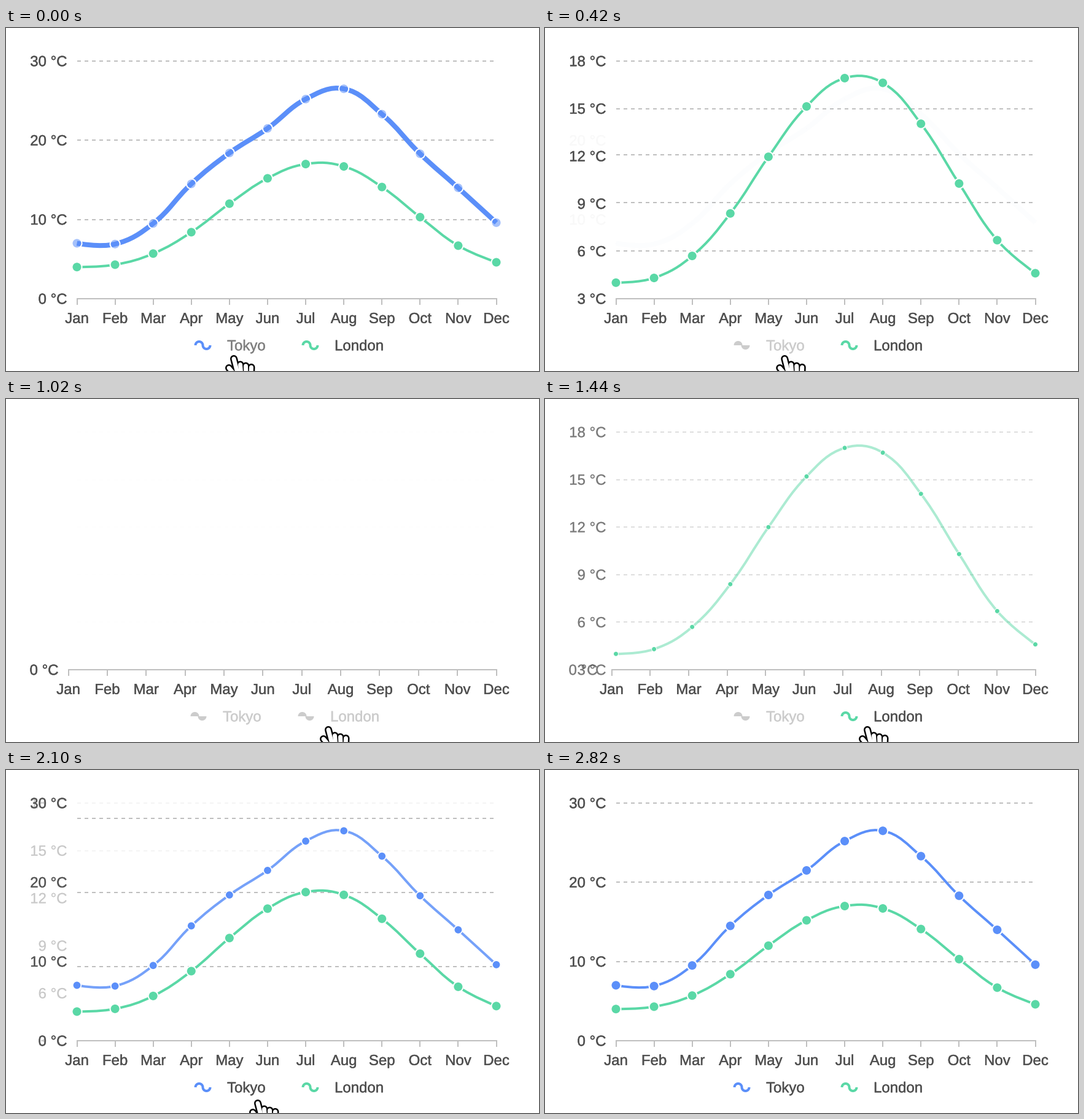
A matplotlib script for the animation above (2.88 s loop, 868 px wide and 560 px high).

```python
import math
from itertools import zip_longest

import matplotlib.pyplot as plt
import numpy as np
from matplotlib.animation import FuncAnimation
from matplotlib.patches import Circle, PathPatch
from matplotlib.path import Path
from matplotlib.patheffects import withStroke

W, H, DPI = 868, 560, 100
STEP_MS, FRAMES = 60, 48
PT = 72 / DPI  # points per pixel

LEFT, RIGHT, TOP, BASE = 115.5, 798.5, 54, 442
TEXT, AXIS, OFF, DIM = "#505050", "#BFBFBF", "#CCCCCC", "#808080"
MONTHS = "Jan Feb Mar Apr May Jun Jul Aug Sep Oct Nov Dec".split()
COUNT = len(MONTHS)


def yearly(mean, cos, sin):
    """Monthly temperatures as a short sum of yearly harmonics."""
    angle = np.arange(COUNT) * math.tau / COUNT
    temps = np.full(COUNT, mean)
    for k, a in enumerate(cos, 1):
        temps += a * np.cos(k * angle)
    for k, b in enumerate(sin, 1):
        temps += b * np.sin(k * angle)
    return np.round(temps, 1)


SERIES = {
    "Tokyo": ("#5B8FF9", yearly(16.22, [-9.1, -0.15],
                                [-2.62, 0.4, -0.65, 0.26, 0.07])),
    "London": ("#5AD8A6", yearly(9.91, [-6.62, 0.55, 0.12], [-0.93, 0.32])),
}


class Scene:
    """One settled state of the chart: its ticks, left edge and visible series."""

    def __init__(self, ticks, left, *shown):
        self.ticks, self.left, self.shown = ticks, left, shown

    def y(self, value):
        lo, hi = self.ticks[0], self.ticks[-1]
        return BASE - (BASE - TOP) * (value - lo) / max(hi - lo, 1)


BOTH = Scene(range(0, 31, 10), LEFT, "Tokyo", "London")
SINGLE = Scene(range(3, 19, 3), LEFT, "London")
EMPTY = Scene(range(1), LEFT - 14)

# Click time in ms, and the scene each click leads to
CLICKS = [(38, SINGLE), (609, EMPTY), (1215, SINGLE), (1804, BOTH)]
FADE_MS = 450
HOVERS = {"Tokyo": [(0, 490), (2460, 2640)], "London": [(520, 1070)]}

# Pointer glides: start, end, and where it comes to rest
POINTER = np.array([371, 535])
GLIDES = [(400, 560, (525, 535)), (1620, 1780, (410, 539)),
          (2520, 2760, (400, 572))]

plt.rcParams["font.family"] = "Liberation Sans"
plt.rcParams["text.hinting"] = "none"
fig = plt.figure(figsize=(W / DPI, H / DPI), dpi=DPI, facecolor="white")
ax = fig.add_axes([0, 0, 1, 1])


def clamp(u):
    return min(max(u, 0), 1)


def ease(u):
    u = clamp(u)
    return 4 * u**3 if u < 0.5 else 1 - 4 * (1 - u) ** 3


def lerp(a, b, p):
    return a + (b - a) * p


def scenes_at(t):
    before, after, p = BOTH, BOTH, 1
    for start, scene in CLICKS:
        if t >= start:
            before, after, p = after, scene, ease((t - start) / FADE_MS)
    return before, after, p


def hovered(name, t):
    return any(a <= t < b for a, b in HOVERS[name])


def text(x, y, label, color=TEXT, ha="center", alpha=1):
    if alpha > 0.004:
        ax.text(x, y + 8.3, label, color=color, ha=ha, va="baseline",
                fontsize=24 * PT, alpha=alpha,
                path_effects=[withStroke(linewidth=0.4 * PT, foreground=color)])


def line(xs, ys, color=AXIS, width=2, cap="butt", **kw):
    ax.plot(xs, ys, color=color, lw=width * PT, solid_capstyle=cap, **kw)


def smooth_path(xs, ys):
    """Bezier spline whose handles follow the chord between neighbours."""
    pts = np.column_stack([xs, ys])
    verts = [pts[0], pts[0]]
    for prev, cur, nxt in zip(pts, pts[1:], pts[2:]):
        v = (nxt - prev) * 0.4
        d0, d1 = math.dist(cur, prev), math.dist(cur, nxt)
        verts += [cur - v * d0 / (d0 + d1), cur, cur + v * d1 / (d0 + d1)]
    verts += [pts[-1], pts[-1]]
    return Path(verts, [Path.MOVETO] + [Path.CURVE4] * (len(verts) - 1))


def draw_axes(before, after, p):
    for a, b in zip_longest(before.ticks[1:], after.ticks[1:]):
        if a is None:
            y, alpha = after.y(b), p
        elif b is None:
            y, alpha = before.y(a), 1 - p
        else:
            y, alpha = lerp(before.y(a), after.y(b), p), 1
        line([LEFT, RIGHT], [y, y], alpha=alpha, dashes=(3, 3), zorder=1)

    for scene, alpha in [(before, 1 - p), (after, p)]:
        for tick in scene.ticks:
            text(scene.left - 16, scene.y(tick), f"{tick} °C", ha="right",
                 alpha=alpha)

    left = lerp(before.left, after.left, p)
    line([left - 1, RIGHT + 1], [BASE, BASE], zorder=1)
    for x, month in zip(np.linspace(left, RIGHT, COUNT), MONTHS):
        line([x, x], [BASE, BASE + 10], zorder=1)
        text(x, 473.4, month)


def draw_series(name, before, after, p, active):
    color, values = SERIES[name]
    was, now = name in before.shown, name in after.shown
    if was and now:
        ys, show = lerp(before.y(values), after.y(values), p), 1
    elif now:
        ys, show = after.y(values), p
    else:
        ys, show = before.y(values), (1 - p) * was
    if show < 0.004:
        return
    xs = np.linspace(LEFT, RIGHT, COUNT)
    ax.add_patch(PathPatch(smooth_path(xs, ys), fc="none", ec=color,
                           lw=(8 if active else 4) * PT, alpha=show,
                           capstyle="butt", joinstyle="round", zorder=3))
    for spot in zip(xs, ys):
        ax.add_patch(Circle(spot, 8 * show, fc=color, ec="none",
                            alpha=0.55 if active else 1, zorder=4))
        ax.add_patch(Circle(spot, 8 * show, fc="none", ec="white",
                            lw=2 * show * PT, zorder=4))


def draw_legend(name, x, on, active):
    color = SERIES[name][0] if on else OFF
    a = np.linspace(0, math.pi, 24)
    xs = np.concatenate([x - 6 - 6 * np.cos(a), x + 6 - 6 * np.cos(a)])
    ys = 518 + np.concatenate([-6 * np.sin(a), 6 * np.sin(a)])
    if not on:
        ax.fill(xs, ys, color=color, lw=0)
    line(xs, ys, color, 4 if on else 2)
    text(x + 39.5, 518, name, (DIM if active else TEXT) if on else OFF, "left")


def draw_pointer(t):
    """A hand built from rounded strokes: black outline first, white on top."""
    pos = POINTER
    for start, end, rest in GLIDES:
        pos = lerp(pos, np.array(rest), clamp((t - start) / (end - start)))
    x, y = pos
    index = (0, 5, 6, 28, 7)
    thumb = (-8, 20, 2, 32, 7)
    palm = (5, 33, 23, 35, 20)
    knuckles = [(10.5 + 9 * i, 14.5 + 2.2 * i, 12 + 8 * i, 32, 7)
                for i in range(3)]
    for color, rim in [("black", 5), ("white", 0)]:
        for x0, y0, x1, y1, width in [index, thumb, palm, *knuckles]:
            line([x + x0, x + x1], [y + y0, y + y1], color, width + rim,
                 "round", zorder=8)


def draw(n):
    t = n * STEP_MS
    before, after, p = scenes_at(t)
    ax.clear()
    ax.set_xlim(0, W)
    ax.set_ylim(H, 0)
    ax.axis("off")

    draw_axes(before, after, p)
    shift = (after.left - LEFT) / 2
    for i, name in enumerate(SERIES):
        active = hovered(name, t)
        draw_series(name, before, after, p, active)
        draw_legend(name, 320.5 + 175 * i + shift, name in after.shown, active)
    draw_pointer(t)
    return []


anim = FuncAnimation(fig, draw, frames=FRAMES, interval=STEP_MS,
                     init_func=lambda: [], repeat=True, repeat_delay=0)
plt.show()
```
